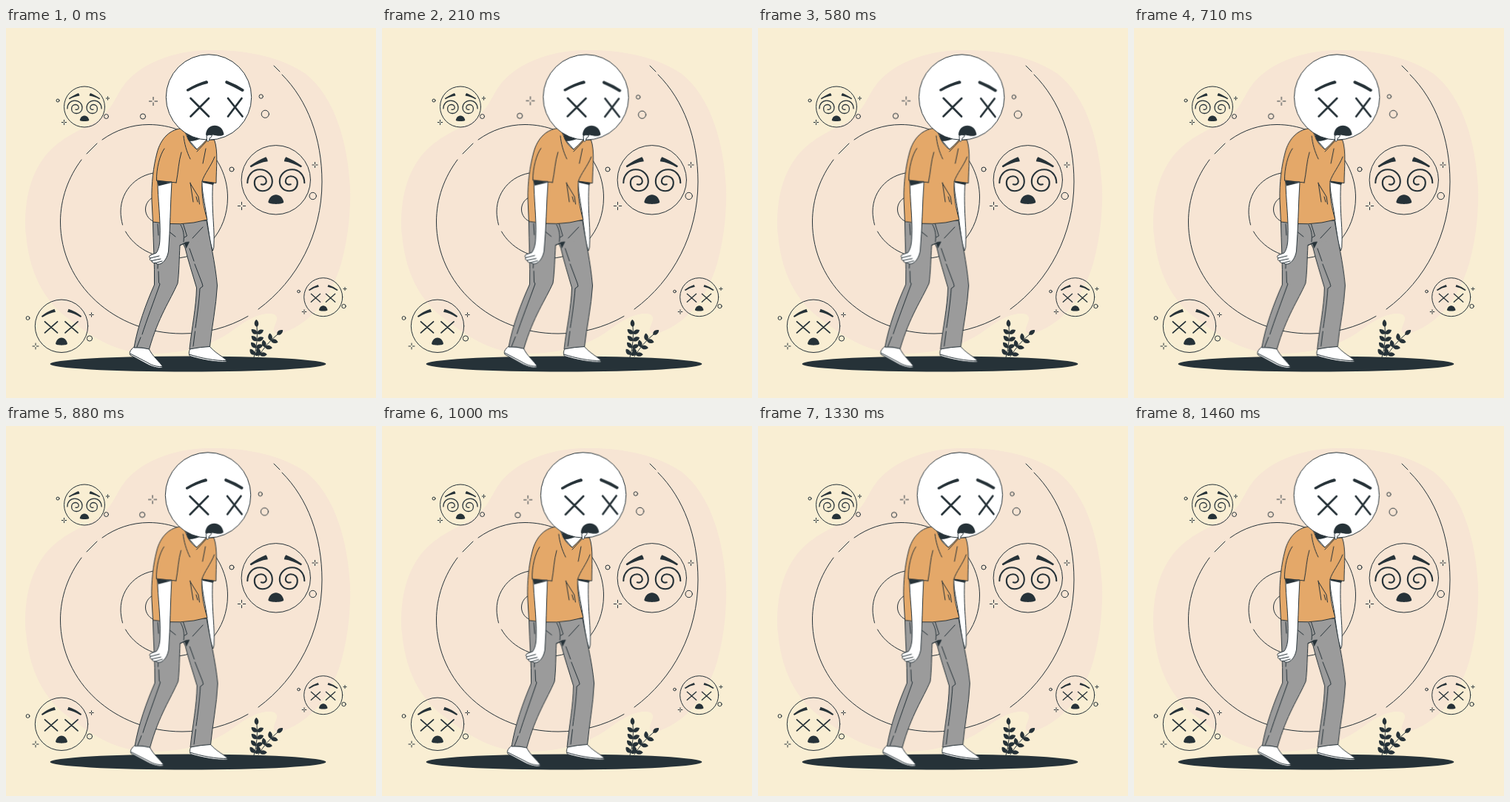
Recreate the animation shown at these times as an HTML page. Size 500 by 500 pixels, loop 1500 ms.

```html
<!DOCTYPE html>
<html lang="en">
<head>
<meta charset="utf-8">
<title>Dizzy</title>
<style>
  html, body { margin: 0; width: 100%; height: 100%; overflow: hidden; background: #f9eed3; }
  svg { display: block; width: 100%; height: 100%; }
  .line { fill: none; stroke: #263238; stroke-linecap: round; stroke-linejoin: round; }
  .line, .shape { stroke-width: 1; }
  .shape { stroke: #263238; stroke-linejoin: round; }
  .dark { fill: #263238; }
  .white { fill: #fff; }
  .shirt { fill: #e4a869; }
  .pants { fill: #9b9b9b; }
  .thin * { vector-effect: non-scaling-stroke; }
  #sway { transform-origin: 262px 249px; animation: sway 1.5s linear infinite; }
  @keyframes sway {
    0%, 100% { transform: rotate(0deg); }
    25% { transform: rotate(1deg); }
    75% { transform: rotate(-1deg); }
  }
</style>
</head>
<body>
<svg viewBox="0 0 500 500">
  <defs>
    <g id="dizzy">
      <g class="dark">
        <path d="M-35 -19C-28 -24 -21 -28 -13.500 -31Q-11 -28 -11 -25C-19 -24 -27 -21 -33.500 -17Q-35 -17 -35 -19Z"/>
        <path d="M35 -19C28 -24 21 -28 13.500 -31Q11 -28 11 -25C19 -24 27 -21 33.500 -17Q35 -17 35 -19Z"/>
        <path d="M-10.500 30C-8 16.500 8 16.500 10.500 30C10 33.500 -10 33.500 -10.500 30Z"/>
      </g>
      <g class="line" style="stroke-width:2.100">
        <path id="curl" d="M-38.500 4C-38.500 -7 -31 -14 -22 -14C-12 -14 -5 -7 -5 2C-5 10 -11 15 -18 15C-25 15 -29 10 -29 4C-29 -2 -25 -5 -20 -5C-15 -5 -13 -1 -13 2C-13 5 -16 7 -20 6"/>
        <use href="#curl" transform="scale(-1 1)"/>
      </g>
    </g>
    <g id="dazed">
      <g class="dark">
        <path d="M-27 -13.500Q-19 -20 -9.500 -23L-8 -19Q-17 -17.500 -25.500 -12Q-27 -12 -27 -13.500Z"/>
        <path d="M27 -13.500Q19 -20 9.500 -23L8 -19Q17 -17.500 25.500 -12Q27 -12 27 -13.500Z"/>
        <path d="M-8 24C-6 13 6 13 8 24C7 26.500 -7 26.500 -8 24Z"/>
      </g>
      <path class="line" style="stroke-width:1.800" d="M-22.500 -6L-5.500 9M-5.500 -6L-22.500 9M22 -6L5 9M5 -6L22 9"/>
    </g>
  </defs>

  <path fill="#f7e5d4" d="M275 30C228 30 178 48 156 82C143 103 140 115 117 129C87 144 60 156 42 190C28 216 24 252 27 280C31 322 46 366 86 394C120 420 150 440 198 440C240 440 277 429 303 411C320 399 334 388 352 386C370 385 367 393 363 403C359 412 364 415 377 411C412 398 439 365 453 318C463 282 466 245 465 215C462 160 447 96 405 62C371 38 320 29 275 30Z"/>

  <path class="line" d="M362 51L370 59M373 63C408 98 427 150 427 208C427 278 394 341 341 380M327 389.500C300 405 269 413 238 413C147 413 73.500 346 73.500 262C73.500 231 84 202 102 178M109 170L123 156M130 151C148 138 170 130.500 193 130.500C252 130.500 299.500 174 299.500 229C299.500 275 267 311 228 311C200 311 174 297 161.500 275M157.500 266C156 260 155 254 155 248C155 219 178 195 210 195M204 227C194 229 188.500 237 188.500 245C188.500 253 194 261 204 263"/>

  <g id="faces"></g>
  <g id="bits"></g>

  <ellipse class="dark" cx="246" cy="454" rx="186.500" ry="10.500"/>
  <g id="plant"></g>

  <g id="sway">
    <g id="halo"></g>

    <!-- far arm -->
    <path class="shape white" d="M264.500 206C265 225 270 242 272 262L276 290L279.500 301Q281.500 297 281 290C282 270 277.500 245 279.500 208Z"/>
    <path class="dark" d="M265 205L282 208L280 212L266 209Z"/>

    <!-- shoes -->
    <path class="shape white" d="M173 431C168 435 166 439 168 442L190 454C199 459 210 461 212 458C208 451 197 443 193 433Z"/>
    <path class="line" d="M168 440L191 452C199 457 206 458 212 457.500"/>
    <path class="shape white" d="M250 432C247 436 246.500 440 248.500 443.500C263 448 284 452.500 298 451C299.500 447 284 441 275 430Z"/>
    <path class="line" d="M247.500 441C263 446 283 450 298 449.500"/>

    <!-- trousers -->
    <path class="shape pants" d="M237 262L271 260C275 285 283 318 285.500 348C284 377 278 404 275.500 430.500Q263 431 248 434C251 405 257 378 257.500 351C252 332 246 314 242 297L236 285Z"/>
    <path class="shape pants" d="M198.500 261L243 262L246 288L235 294C234 312 234 330 232 345C222 368 206 390 193.500 434Q183 431 173 432C178 403 189 373 200.500 347C201 320 199 291 198.500 261Z"/>
    <path class="pants" d="M230 264H262V288L240 289L234 292Z"/>
    <path class="dark" d="M241 291L248 289L243.500 298Z"/>
    <path class="line" d="M235 293.500L247 289M236 266C240 273 241 280 240 289M239.500 265L244.500 281L241 283M266 269L252 284M219 274L229 282M205 265L206 280M209 265L211 276M206 304L205 325M206 329L206.500 344L208 346C201 366 189 398 184 414M182 418L177 431M248 298L254 315M255 319L265 345L266 349L262 352C261 370 258 391 256 405M255.500 410L253 430"/>

    <!-- neck and shirt -->
    <path class="shape white" d="M243 136L247 153L257 168L272 151V136Z"/>
    <path class="dark" d="M243 138L247 153Q258 153 268 147Z"/>
    <path class="shape shirt" d="M240 135.500C222 136 209 149 204 169C199 188 196.500 210 197 232L198.500 262Q236 269 272 259C267 243 264 226 265 207L284 209.500C284 190 287 166 281.500 151L271 151Q264 159 258 164C252 160 248 154 246 150Z"/>
    <path class="line" d="M203.500 206C203 190 208 171 214 163M237 168C233 181 233 194 230 209M240 146C241 156 244 167 249 177M270 163L266 183M282 174C277 187 268 197 265 207M249 209L253 235M249 210L260 228L261.500 238M257 228L259 235M246 150L258 164M272 152L258 167"/>

    <!-- near arm -->
    <path class="shape white" d="M205 207C205 231 209 257 208 283C208 293 206 300 203 304L195 307Q192 309.500 195 311Q193 314 197 314.500Q197 318 202 317.500Q204 320 208 319C214 317 218 310 219.500 302C222 271 222 240 224 208Z"/>
    <path class="line" d="M195 311L207 308M197 314.500L209 312M202 317.500L211 315"/>
    <path class="dark" d="M204 206.500L224 209L206 213.500Z"/>
    <path class="line" d="M203.500 206L230 209"/>

    <!-- head -->
    <circle class="shape white" cx="274" cy="93.500" r="57.700"/>
    <path class="dark" d="M244 83Q257 75 271 71Q274 72 272.500 75Q259 78 246.500 85.500Q243.500 86 244 83Z"/>
    <path class="dark" d="M298 71Q311 76 321.500 83Q322 86 319 86Q307 79 297 75Q295 72 298 71Z"/>
    <path class="line" style="stroke-width:2.700" d="M249.500 95L274 119.500M274 95L249.500 119.500M300 95L319.500 119.500M318.500 95L300 119.500"/>
    <path class="dark" d="M270 144C271 127.500 293 127.500 294.500 144C291 147 284 145.500 280 144.500C276 144.500 271 147 270 144Z"/>
    <path class="shape white" d="M271 145.500L271.500 152.500Q273 154.500 274.500 152L275 149Q278 148 278.500 144.500Q274 143.500 271 145.500Z"/>
  </g>
</svg>
<script>
  const put = (id, html) => document.getElementById(id).innerHTML += html;

  const ring = (x, y, r) => `<circle class="line" cx="${x}" cy="${y}" r="${r}"/>`;

  const spark = (x, y, s) => {
    const g = s * 0.35, n = s - g;
    return `<path class="line" d="M${x - s} ${y}h${n}M${x + g} ${y}h${n}M${x} ${y - s}v${n}M${x} ${y + g}v${n}"/>`;
  };

  const face = (kind, x, y, r, k) =>
    ring(x, y, r) + `<use href="#${kind}" transform="translate(${x} ${y}) scale(${k})"/>`;

  put('faces',
    face('dizzy', 106, 106.5, 27.5, 0.6) +
    face('dizzy', 364.8, 205.3, 46.7, 1) +
    face('dazed', 75, 402.8, 35.7, 1) +
    face('dazed', 428.7, 363.7, 26, 0.73));

  put('bits',
    [[70, 98, 2], [135.5, 119.5, 3], [305, 191, 3], [414.7, 227, 4.7], [29.5, 392, 2.4],
     [113, 419.5, 3.6], [395.5, 356, 1.8], [456.5, 376, 2.7]].map(a => ring(...a)).join('') +
    [[137.5, 95, 2.2], [78.5, 127.5, 3.2], [417.5, 185, 3.6], [318.5, 240.5, 5.2], [115.5, 387.5, 2.7],
     [40, 430, 4], [458, 352.5, 2], [403, 383.5, 2.8]].map(a => spark(...a)).join(''));

  put('halo', ring(185, 119.5, 3.6) + ring(344.7, 92.5, 2.7) + ring(350.3, 116.3, 5.1) + spark(199, 99, 5.6));

  const leaf = (x, y, a) =>
    `<path class="dark" transform="translate(${x} ${y}) rotate(${a})" d="M0 0C2 -4 7 -4 10 0C7 3.500 2 3.500 0 0Z"/>`;

  // Paired leaves along a bent stem, with one at the tip.
  const sprig = (x0, y0, cx, cy, x1, y1, pairs) => {
    let out = `<path class="line" d="M${x0} ${y0}Q${cx} ${cy} ${x1} ${y1}"/>`;
    for (let i = 0; i <= pairs; i++) {
      const t = 0.08 + 0.9 * i / pairs, u = 1 - t;
      const x = u * u * x0 + 2 * u * t * cx + t * t * x1;
      const y = u * u * y0 + 2 * u * t * cy + t * t * y1;
      const a = Math.atan2(u * (cy - y0) + t * (y1 - cy), u * (cx - x0) + t * (x1 - cx)) * 180 / Math.PI;
      out += i < pairs ? leaf(x, y, a - 52) + leaf(x, y, a + 58) : leaf(x, y, a);
    }
    return out;
  };

  put('plant', sprig(335, 445, 341, 424, 339, 403, 4) + sprig(341, 444, 352, 426, 367, 414, 3));
</script>
</body>
</html>
```
